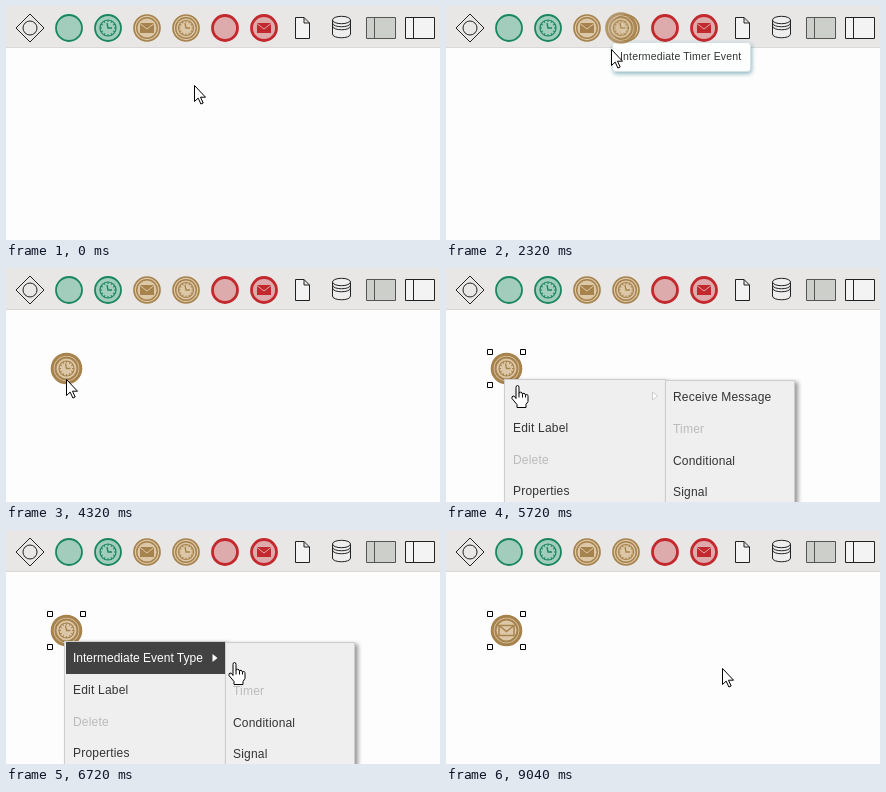
Animation, 434 px wide and 234 px high, one loop 9960 ms. Source, as an HTML page:

```html
<!DOCTYPE html>
<html lang="en">
<head>
<meta charset="utf-8">
<style>
  html, body { margin: 0; width: 100%; height: 100%; overflow: hidden; background: #fdfdfd; }
  svg { display: block; width: 434px; height: 234px; font-family: "Liberation Sans", Arial, sans-serif; font-size: 12px; }
  .line { fill: none; stroke: #222; }
  .tan { --fill: #dcc8a8; --ink: #a6824c; }
  .green { --fill: #a2ccbb; --ink: #188660; }
  .red { --fill: #deabad; --ink: #c3282c; }
  .disc { fill: var(--fill); stroke: var(--ink); }
  .ring { fill: none; stroke: var(--ink); }
  .solid { fill: var(--ink); }
  .flap { fill: none; stroke: var(--fill); }
  .panel { fill: #efefef; stroke: #cdcdcd; filter: drop-shadow(3px 2px 2px #0006); }
  .tip { fill: #fdfefe; stroke: #d5e0e4; filter: drop-shadow(1px 2px 2px #4a8c9e99); }
</style>
</head>
<body>
<svg viewBox="0 0 434 234">
  <rect width="434" height="41" fill="#e8e7e6"/>
  <path d="M0 41.5H434" stroke="#d9d8d6"/>
  <g id="toolbar">
    <g class="line">
      <path d="M10 22L24 8L38 22L24 36Z"/><circle cx="24" cy="22" r="7"/>
      <path d="M289.5 11.5H298L303.5 17V32.5H289.5ZM298 11.5V17H303.5" fill="#f3f3f3"/>
      <path d="M326.5 14V28C326.5 33 344.5 33 344.5 28V14" fill="#eee"/>
      <ellipse cx="335.5" cy="14" rx="9" ry="3.7" fill="#eee"/>
      <path d="M326.5 17C326.5 22 344.5 22 344.5 17M326.5 20C326.5 25 344.5 25 344.5 20"/>
      <path d="M360.5 11.5H389.5V32.5H360.5ZM368.5 11.5V32.5" fill="#cdd0ca" stroke="#555"/>
      <path d="M399.5 11.5H428.5V32.5H399.5ZM407.5 11.5V32.5" fill="#f3f3f3"/>
    </g>
  </g>
  <g id="timerShape" class="tan"></g>
  <g id="messageShape" class="tan"></g>
  <path id="handles" fill="#fff" stroke="#000" d="M41.5 81.5h5v5h-5zM74.5 81.5h5v5h-5zM41.5 114.5h5v5h-5zM74.5 114.5h5v5h-5z"/>
  <g id="menu">
    <rect class="panel" x="58.5" y="111.5" width="161" height="140"/>
    <rect id="typeRow" x="60" y="112" width="159" height="32" fill="#424242"/>
    <path id="arrow" d="M206.5 124L211.5 128L206.5 132Z"/>
  </g>
  <g id="submenu">
    <rect class="panel" x="219.5" y="112.5" width="129" height="140"/>
    <rect id="messageRow" x="220" y="113" width="129" height="32" fill="#424242"/>
  </g>
  <g id="tooltip">
    <rect class="tip" x="166.5" y="36.5" width="138" height="29" rx="3"/>
    <text x="174" y="54" font-size="10.5" letter-spacing=".17" fill="#333">Intermediate Timer Event</text>
  </g>
  <g id="ghost" class="tan" opacity=".8"></g>
  <g id="cursor" fill="#fff" stroke="#000" stroke-linejoin="round">
    <path id="pointer" d="M0 0V16L3.7 12.6L6.4 18.5L8.7 17.5L6 11.7H11Z"/>
    <g id="hand">
      <path d="M-1.5 13V2Q-1.5 0 0 0T1.5 2V8Q1.5 6.5 3.2 6.7T5 9Q5 7.5 6.5 7.8T8 10Q8.5 8.7 9.7 9.2T10.5 11V16L8.5 19V22H-.5V19L-5.5 13Q-6 11 -4.5 10.5T-1.5 13Z"/>
      <path d="M1.5 8V12M5 9V12M8 10V12" fill="none"/>
    </g>
  </g>
</svg>
<script>
const LOOP = 9960;
const $ = id => document.getElementById(id);
const add = (id, markup) => $(id).insertAdjacentHTML('beforeend', markup);

const circle = (cls, r, width) => `<circle class="${cls}" r="${r}" stroke-width="${width}"/>`;
const clock = r => {
  let marks = '';
  for (let a = 0; a < 360; a += 30) marks += `<path class="ring" d="M0 ${-r}v2" transform="rotate(${a})"/>`;
  return circle('ring', r, 1.2) + marks + '<path class="ring" d="M-1 -5L0 0H4" stroke-width="1.3"/>';
};
const envelope = '<rect class="solid" x="-7" y="-5" width="14" height="10"/><path class="flap" d="M-7 -4.5L0 1L7 -4.5"/>';
const openEnvelope = '<path class="ring" d="M-7.5 -5H7.5V5H-7.5ZM-7.5 -5L0 1L7.5 -5" stroke-width="1.5"/>';
const icon = (x, color, body) => add('toolbar', `<g class="${color}" transform="translate(${x} 22)">${body}</g>`);

const single = circle('disc', 13, 1.8), double = circle('disc', 13, 1.7) + circle('ring', 10.3, 1.4);
const thick = circle('disc', 12.5, 2.8), large = circle('disc', 14.3, 3) + circle('ring', 11, 2);
icon(63, 'green', single);
icon(102, 'green', single + clock(8));
icon(141, 'tan', double + envelope);
icon(180, 'tan', double + clock(7.5));
icon(219, 'red', thick);
icon(258, 'red', thick + envelope);
add('timerShape', large + clock(7.5));
add('messageShape', large + openEnvelope);
add('ghost', large + clock(7.5));

const label = (menu, id, x, y, text, color = '#333', spacing = .2) =>
  add(menu, `<text id="${id}" x="${x}" y="${y}" fill="${color}" letter-spacing="${spacing}">${text}</text>`);
label('menu', 'typeLabel', 67, 132, 'Intermediate Event Type', '#333', 0);
label('menu', 'edit', 67, 164, 'Edit Label');
label('menu', 'delete', 67, 196, 'Delete', '#bbb');
label('menu', 'properties', 67, 227, 'Properties');
label('submenu', 'messageLabel', 227, 133, 'Receive Message');
label('submenu', 'timer', 227, 165, 'Timer', '#bbb');
label('submenu', 'conditional', 227, 197, 'Conditional');
label('submenu', 'signal', 227, 228, 'Signal');

// Motion paths: [time, x, y]
const cursorPath = [
  [0, 188.5, 79.5], [320, 188.5, 79.5], [1240, 165.5, 43.5], [2320, 165.5, 43.5],
  [3040, 44.5, 84.5], [3240, 44.5, 84.5], [3320, 61.5, 99.5], [3560, 61.5, 99.5],
  [3920, 61.5, 127.5], [4080, 61.5, 127.5], [4320, 60.5, 111.5], [5719, 60.5, 111.5],
  [5720, 71.5, 117.5], [6280, 71.5, 117.5], [6720, 228.5, 132.5], [6840, 228.5, 132.5],
  [7240, 263.5, 131.5], [7280, 263.5, 131.5], [7520, 278.5, 138.5], [8519, 278.5, 138.5],
  [8520, 276.5, 138.5], [LOOP, 276.5, 138.5]
];
const ghostPath = [[2320, 175, 22], [3040, 44, 72], [3240, 44, 72], [3290, 62, 88], [LOOP, 62, 88]];

const ramp = (t, from, to) => Math.min(1, Math.max(0, (t - from) / (to - from)));
const show = (id, on) => $(id).style.display = on ? '' : 'none';
const fade = (id, value) => $(id).setAttribute('opacity', value);
const place = (id, x, y) => $(id).setAttribute('transform', `translate(${x} ${y})`);

function follow(id, path, t) {
  const i = Math.max(1, path.findIndex(p => p[0] > t));
  const [t0, x0, y0] = path[i - 1], [t1, x1, y1] = path[i];
  const k = ramp(t, t0, t1), e = k * k * (3 - 2 * k);
  place(id, x0 + (x1 - x0) * e, y0 + (y1 - y0) * e);
}

place('timerShape', 60.5, 100.5);
place('messageShape', 60.5, 100.5);

function draw(t) {
  const within = (from, to) => t >= from && t < to;
  follow('cursor', cursorPath, t);
  follow('ghost', ghostPath, t);
  show('hand', within(5720, 8520));
  show('pointer', !within(5720, 8520));
  show('tooltip', within(1240, 2400));
  fade('tooltip', ramp(t, 1160, 1400));
  show('ghost', within(2320, 3320));
  show('timerShape', within(3600, 8520));
  show('messageShape', t >= 8520);
  show('handles', t >= 4920);
  show('menu', within(4920, 8520));
  fade('menu', ramp(t, 4840, 5040));
  show('submenu', within(5720, 8520));
  // Labels turn white before their row darkens
  fade('typeRow', ramp(t, 5839, 6040));
  fade('messageRow', ramp(t, 6839, 7040));
  $('typeLabel').setAttribute('fill', t < 5720 ? '#333' : t < 5840 ? '#efefef' : '#fff');
  $('messageLabel').setAttribute('fill', t < 6680 ? '#333' : t < 6840 ? '#efefef' : '#fff');
  $('arrow').setAttribute('fill', t < 5720 ? '#333' : '#fff');
  $('arrow').setAttribute('stroke', within(5720, 5840) ? '#ccc' : 'none');
}

const start = performance.now();
function tick() {
  draw((performance.now() - start) % LOOP);
  requestAnimationFrame(tick);
}
tick();
</script>
</body>
</html>
```
